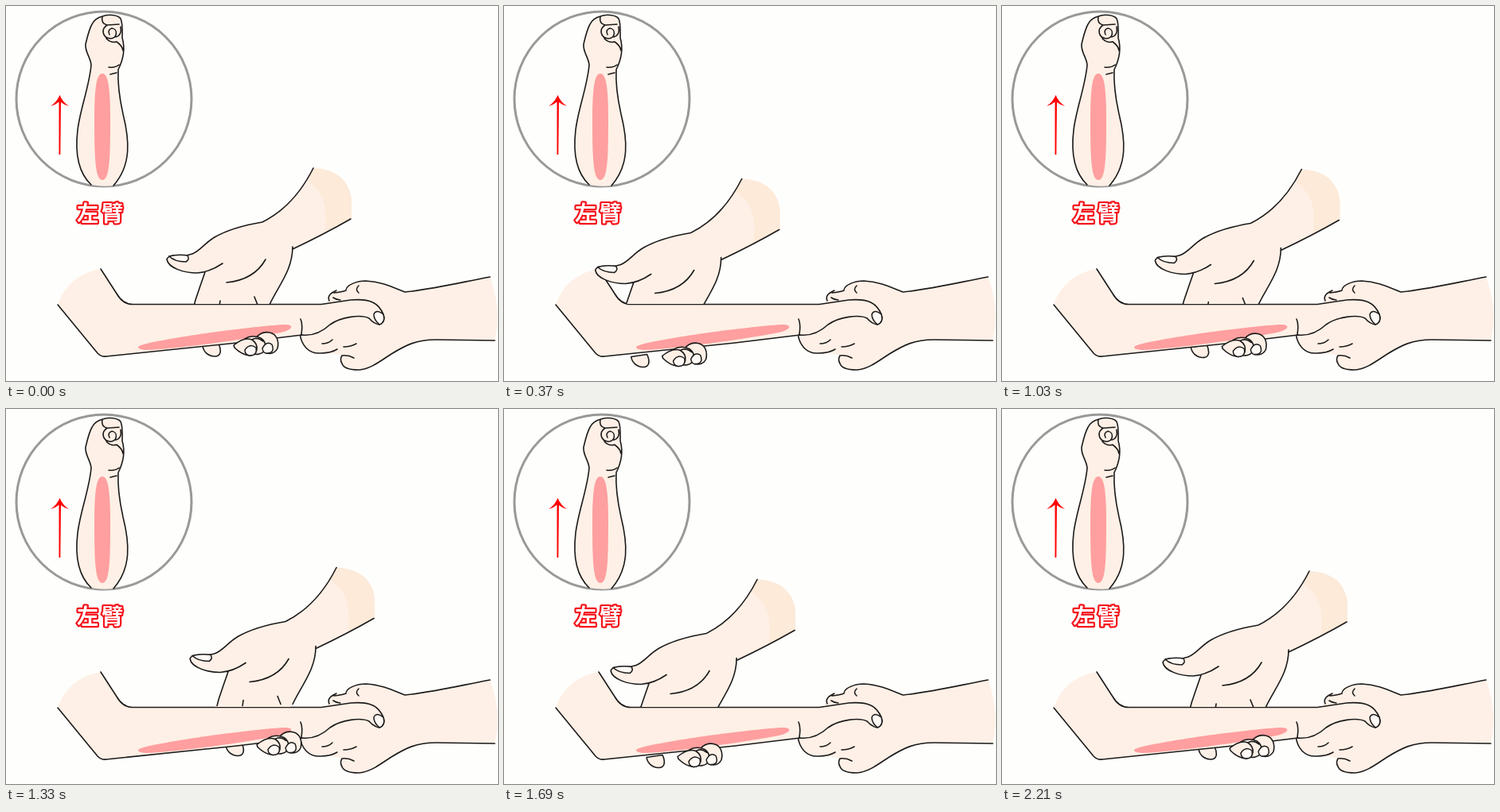
Recreate the animation shown at these times as an HTML page. Size 618x472 px, loop 2.29 s.

```html
<!DOCTYPE html>
<html lang="zh">
<head>
<meta charset="utf-8">
<title>左臂</title>
<style>
  html, body { margin: 0; width: 100%; height: 100%; overflow: hidden; background: #fefefc; }
  svg { display: block; width: 100vw; height: 100vh; }
  .line { fill: none; stroke: #1c1a1a; stroke-width: 1.6; stroke-linecap: round; stroke-linejoin: round; }
  .skin { fill: #fef0e6; }
  .shade { fill: #fdead9; }
  .both { fill: #fef0e6; stroke: #1c1a1a; stroke-width: 1.6; stroke-linejoin: round; }
  .nail { fill: #fffaf6; stroke: #1c1a1a; stroke-width: 1.5; }
  .pink { fill: #ff9f9f; }
  text { font: 900 27px "Noto Sans CJK SC", "Noto Sans CJK", sans-serif; letter-spacing: 4px; fill: #fff;
         stroke: #f5141c; stroke-width: 4.4; stroke-linejoin: round; paint-order: stroke; }
</style>
</head>
<body>
<svg viewBox="0 0 618 472">
  <clipPath id="aboveArm"><path d="M0 0H618V375H0Z"/></clipPath>

  <!-- inset -->
  <circle cx="123" cy="117" r="110" fill="none" stroke="#999" stroke-width="3"/>
  <path class="skin" d="M107 74C106 64 99 58 100 48C102 40 104 30 108 23C111 17 117 14 121 13C128 10 141 11 144 16C147 22 146 34 146 40C150 54 147 68 141 80C140 98 143 118 147 136C155 168 158 200 135 226Q122 228 107 225C89 208 87 181 90 156C93 130 105 100 107 74Z"/>
  <path class="line" d="M107 225C89 208 87 181 90 156C93 130 105 100 107 74C106 64 99 58 100 48C102 40 104 30 108 23C111 17 117 14 121 13C128 10 141 11 144 16C147 22 146 34 146 40C150 54 147 68 141 80C140 98 143 118 147 136C155 168 158 200 135 226
    M121 13Q119 22 127 24L142 23M127 24C119 29 121 40 131 41C140 41 141 29 133 28Q127 30 130 36M144 26Q146 37 138 39M126 41Q132 47 139 45Q146 50 147 56M129 77Q137 78 142 74M131 86L139 84"/>
  <path class="pink" d="M121 85C128 85 131 101 131 143C131 192 130 219 121 219C112 219 111 192 111 143C111 101 114 85 121 85Z"/>
  <path d="M66.500 187V119H69L68.300 187ZM67.500 112Q71 121 79 126Q72 124 67.500 120Q63 124 56 126Q64 121 67.500 112Z" fill="red"/>
  <text x="89" y="271">左臂</text>

  <path data-moves class="both" d="M247 428C248 435 254 441 262 441C270 441 271 434 267 425Z"/>

  <!-- holding hand -->
  <path class="skin" d="M406 371C403 364 409 361 415 358L427 358C427 351 441 346 452 346C473 347 488 355 501 360C540 356 575 347 608 341Q623 382 614 421L540 420C515 420 502 427 484 438C470 447 458 457 443 458C432 458 424 456 422 450Q419 445 422 440Q408 436 395 437C380 438 371 427 369 412Z"/>
  <path class="line" d="M406 371C403 364 409 361 415 358M412 361Q422 360 427 358C427 351 441 346 452 346C473 347 488 355 501 360C540 356 575 347 608 341M614 421L540 420C515 420 502 427 484 438C470 447 458 457 443 458C432 458 424 456 422 450Q419 445 422 440M369 412C371 427 380 438 395 437Q408 437 416 432M422 440Q430 439 437 443M411 367Q415 370 420 370M443 352Q438 357 443 361M397 425Q405 425 410 420M424 429Q433 429 440 425"/>

  <!-- stretched arm -->
  <path class="skin" d="M65 376C74 350 94 335 119 331L139 362Q147 376 160 375.500H396L433 370C458 368 468 374 474 388Q477 398 469 401Q462 400 456 393C446 388 421 391 407 401Q391 416 372 414L290 424L126 441Q120 442 115 437Z"/>
  <path class="line" d="M119 331L139 362Q147 376 160 375.500H396L433 370C458 368 468 374 474 388Q477 398 469 401Q462 400 456 393C446 388 421 391 407 401Q391 416 372 414L290 424L126 441Q120 442 115 437L65 376M370 394Q373 400 371 413"/>
  <path class="nail" d="M474 388Q465 381 462 388Q462 395 469 401Q477 398 474 388Z"/>
  <path class="pink" d="M167 428C185 420 300 404 348 401C364 400 360 408 345 411C310 418 215 432 176 433Q163 432 167 428Z"/>

  <!-- stroking hand -->
  <g clip-path="url(#aboveArm)">
    <g data-moves>
      <path class="skin" d="M386 204Q428 206 434 242V268Q400 287 360 306C358 333 342 352 331 376L313 396H226L238 370L250 335C229 339 204 330 202 319Q203 314 214 314Q226 315 234 312C244 308 250 298 262 291C276 283 298 276 322 272C348 259 370 236 386 204Z"/>
      <path class="shade" d="M386 204Q428 206 434 242V268L400 286Q408 237 377 219Z"/>
      <path class="line" d="M386 204C370 236 348 259 322 272C298 276 276 283 262 291C250 298 244 308 234 312Q226 315 214 314Q203 314 202 319C204 330 224 336 240 336Q256 335 272 324M433 268Q400 287 360 306M360 303C360 333 342 352 331 376M250 335Q244 352 238 370L236 378M326 319C316 337 298 346 277 348M312 366L316 376M269 371L268 378"/>
      <path class="nail" d="M205 315Q216 312 228 314Q231 319 226 322Q212 322 205 315Z"/>
    </g>
  </g>
  <g data-moves>
    <path class="both" d="M313 419Q320 409 331 411C341 413 343 423 341 431Q337 439 327 437Z"/>
    <path class="both" d="M300 419Q309 413 320 418C329 424 327 436 318 438Q310 440 304 434Z"/>
    <path class="both" d="M286 427Q299 416 309 420C319 427 316 440 306 440Q296 439 287 430Z"/>
    <path class="nail" d="M300 433Q306 424 314 430Q316 440 306 440Q300 439 300 433ZM322 431Q327 421 334 426Q338 436 329 437Q323 438 322 431Z"/>
    <path class="line" d="M309 420Q315 416 323 422"/>
  </g>
</svg>
<script>
  const LOOP = 2290;
  // When the hand moves on, and the place along the stroke it moves to
  const times = [0, 60, 220, 300, 370, 510, 590, 650, 810, 890, 950, 1030, 1110, 1170, 1250, 1330,
                 1390, 1470, 1550, 1610, 1690, 1770, 1830, 1910, 1990, 2070, 2130, 2210];
  const opening = [11, 13, 14, 1, 2];
  const placeAt = i => i < opening.length ? opening[i] : (i - 1) % 15;
  const parts = document.querySelectorAll('[data-moves]');

  function draw() {
    const t = performance.now() % LOOP;
    const step = placeAt(times.findLastIndex(start => start <= t)) - 11;
    for (const part of parts) {
      part.setAttribute('transform', `translate(${step * 9.7} ${step * -1.5})`);
    }
    requestAnimationFrame(draw);
  }
  draw();
</script>
</body>
</html>
```
